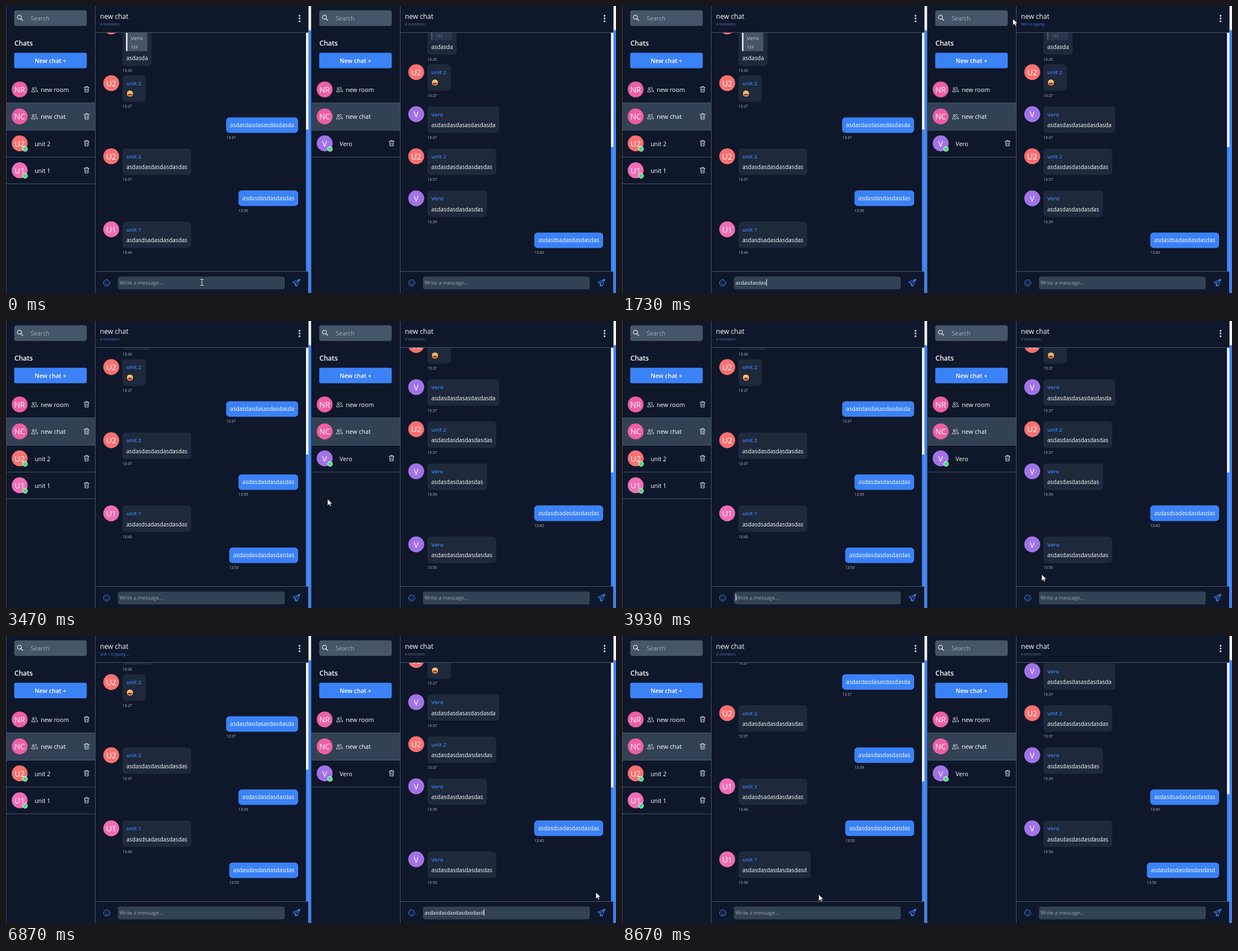
Write an HTML page with a canvas that moves like this. It is 1090x514 px and loops after 9590 ms.

```html
<!DOCTYPE html>
<html lang="en">
<head>
<meta charset="utf-8">
<title>Chat</title>
<style>
html, body { margin: 0; width: 100%; height: 100%; overflow: hidden; background: #0f172a; }
canvas { display: block; }
</style>
</head>
<body>
<canvas id="stage" width="1090" height="514"></canvas>
<script>
const c = document.getElementById('stage').getContext('2d');
const LOOP = 9590;
const BG = '#0f172a', LINE = '#475569', BLUE = '#3b82f6', WHITE = '#fff';
const people = {
  v: { name: 'Vero', mark: 'V', color: '#a273e6' },
  a: { name: 'unit 1', mark: 'U1', color: '#f16db5' },
  b: { name: 'unit 2', mark: 'U2', color: '#f97070' }
};
const log = [
  { who: 'b', text: 'asdasda', time: '13:26', quote: true },
  { who: 'b', text: '', time: '13:27' },
  { who: 'v', text: 'asdasdasdasasdasdasda', time: '13:37' },
  { who: 'b', text: 'asdasdasdasdasdasdas', time: '13:37' },
  { who: 'v', text: 'asdasdasdasdasdas', time: '13:39' },
  { who: 'a', text: 'asdasdsadasdasdasdas', time: '13:40' },
  { who: 'v', text: 'asdasdasdasdasdasdas', time: '13:50' },
  { who: 'a', text: 'asdasdasdasdasdasdasd', time: '13:50' }
];

// Piecewise linear keys: [time, value, value...]
function at(keys, t) {
  let i = 0;
  while (i < keys.length - 2 && t >= keys[i + 1][0]) i++;
  const [p, q] = [keys[i], keys[i + 1]];
  const k = Math.min(1, Math.max(0, (t - p[0]) / (q[0] - p[0])));
  return p.slice(1).map((v, n) => v + (q[n + 1] - v) * k);
}

function setFont(size, weight = 400) {
  c.font = `${weight} ${size}px "Open Sans", "Noto Sans", sans-serif`;
}
// y is the middle of the capitals
function text(s, x, y, size, color = WHITE, weight = 400, align = 'left') {
  setFont(size, weight);
  c.fillStyle = color;
  c.textAlign = align;
  c.fillText(s, x, y + size * 0.36);
}
function width(s, size, weight) {
  setFont(size, weight);
  return c.measureText(s).width;
}
function rect(x, y, w, h, color, r = 0) {
  c.fillStyle = color;
  c.beginPath();
  c.roundRect(x, y, w, h, r);
  c.fill();
}
function disc(x, y, r, color) {
  c.fillStyle = color;
  c.beginPath();
  c.arc(x, y, r, 0, 7);
  c.fill();
}
function stroke(d, x, y, color, w = 1) {
  c.save();
  c.translate(x, y);
  c.strokeStyle = color;
  c.lineWidth = w;
  c.lineJoin = c.lineCap = 'round';
  c.stroke(new Path2D(d));
  c.restore();
}
function fill(d, x, y, color, edge) {
  c.save();
  c.translate(x, y);
  const p = new Path2D(d);
  c.fillStyle = color;
  c.fill(p);
  if (edge) {
    c.strokeStyle = edge;
    c.lineWidth = 0.7;
    c.stroke(p);
  }
  c.restore();
}
function avatar(x, y, mark, color) {
  disc(x, y, 14.2, color);
  text(mark, x, y + 0.5, 14, WHITE, 500, 'center');
}

const trash = 'M-4.5-3.5H4.5M-1.5-3.5V-5H1.5V-3.5M-3.7-3.5L-3 5H3L3.7-3.5M-1.3-1.2V3M1.3-1.2V3';
const group = 'M-4-1.8A1.7 1.7 0 1 1-.6-1.8A1.7 1.7 0 1 1-4-1.8M-5.5 4C-5.3-.3.8-.3 1 4Z' +
  'M1-3.8A1.8 1.8 0 1 1 1.8-.3M2.5.8C4.4.8 5.4 2.2 5.6 4H3';
const smile = 'M5.6 0A5.6 5.6 0 1 1-5.6 0A5.6 5.6 0 1 1 5.6 0M-2.8 1.5Q0 5 2.8 1.5M-2-2V-1.4M2-2V-1.4';
const plane = 'M6.5-6.5L-6.5-1L-2.3 1.5L1 6.5ZM6.5-6.5L-2.3 1.5V6L.2 4';

function grin(x, y) {
  disc(x, y, 5.5, '#f8b53c');
  disc(x - 2, y - 2, 1.7, WHITE);
  disc(x + 2, y - 2, 1.5, WHITE);
  disc(x - 1.8, y - 1.8, 0.8, '#402a20');
  disc(x + 2, y - 2, 0.7, '#402a20');
  fill('M-3.6.6H3.6Q3 4.5 0 4.5T-3.6.6', x, y, '#8c2430');
  rect(x - 1.2, y + 2.4, 2.8, 2, '#f06a7c', 1);
}

function row(y, label, mark, color, opt) {
  const bottom = Math.round(y + 24);
  if (opt.active) rect(1, bottom - 48, 158, 48, '#334155');
  rect(1, bottom, 158, 1, LINE);
  avatar(24.4, y, mark, color);
  if (opt.group) stroke(group, 51, y, '#e2e8f0', 0.9);
  else {
    disc(34, y + 10, 4.7, WHITE);
    disc(34, y + 10, 3.7, '#3fdc7c');
  }
  text(label, opt.group ? 62 : 51, y + 0.7, 10.7);
  if (opt.trash) stroke(trash, 144, y - 0.3, '#e2e8f0', 0.9);
}

function sidebar(p) {
  rect(14.7, 7.8, 129.6, 28, LINE, 4);
  stroke('M3.5 0A3.5 3.5 0 1 1-3.5 0A3.5 3.5 0 1 1 3.5 0M2.5 2.5L6 6', 24, 20, '#f1f5f9', 1.1);
  text('Search', 44, 22.3, 10.7, '#a3acba');
  text('Chats', 15, 66.3, 12.1, WHITE, 600);
  rect(14.7, 83.8, 129.6, 27.7, BLUE, 3);
  text('New chat +', 79.5, 98.2, 10.6, WHITE, 600, 'center');
  const own = p.self === 'v';
  row(149.4, 'new room', 'NR', '#ed5ea5', { group: true, trash: own });
  row(197.8, 'new chat', 'NC', '#ed5ea5', { group: true, active: true, trash: own });
  (own ? ['b', 'a'] : ['v']).forEach((id, i) => {
    const u = people[id];
    row(246 + i * 48.3, u.name, u.mark, u.color, { trash: true });
  });
  rect(159, 0, 1, 514, LINE);
  rect(0, 0, 1, 514, '#3b475a');
}

function bubble(m, y, p, pending) {
  const mine = m.who === p.self, u = people[m.who];
  const name = mine ? 0 : width(u.name, 9.7, 600);
  const w = Math.max(name, width(m.text, 10), 28) + 14;
  const x = mine ? 522 - w : 208;
  const h = m.quote ? 84.5 : mine ? 27.8 : 47.5;
  rect(x, y, w, h, mine ? BLUE : '#1e293b', 6);
  if (!mine) {
    avatar(188, y + 14.1, u.mark, u.color);
    text(u.name, 215, y + 14.5, 9.7, BLUE, 600);
  }
  if (m.quote) {
    const lit = p.self === 'v';
    rect(214.5, y + 24, 38, 34, lit ? LINE : '#29364a', 2);
    rect(214.5, y + 24, 2.5, 34, lit ? '#f1f5f9' : LINE);
    text('Vero', 223, y + 35, 9.7, lit ? '#a5afbe' : '#64748b', 600);
    text('123', 223.5, y + 51, 6.7, lit ? '#e2e8f0' : '#718096');
  }
  if (m.text) text(m.text, x + 7, y + h - 13.8, 10, WHITE, 500);
  else grin(221.5, y + 32.8);
  text(m.time, x, y + h + 8.3, 6.7, '#b6bfcc');
  if (pending) stroke('M4 0A4 4 0 1 1-4 0A4 4 0 1 1 4 0M0-2.3V0L1.6 1', 517, y + h + 7, '#94a3b8', 0.8);
}

function panel(p) {
  c.save();
  c.translate(p.x, 0);
  rect(0, 0, 545, 514, BG);
  sidebar(p);

  text('new chat', 168, 18.2, 12.1);
  if (p.typist) text(p.typist + ' is typing...', 168, 32.8, 6.65, BLUE);
  else text('4 members', 168, 32.8, 6.65, p.self === 'v' ? '#5b6fae' : '#64748b');
  for (const y of [17.4, 22.3, 27.2]) disc(524.5, y, 1.5, WHITE);

  c.save();
  c.beginPath();
  c.rect(160, 48, 376, 427);
  c.clip();
  let y = 461.3;
  for (let i = p.count - 1; i >= 0; i--) {
    const m = log[i];
    y -= m.quote ? 112.4 - 11 : m.who === p.self ? 55.6 : 75.35;
    bubble(m, y, p, p.pending && i === p.count - 1);
  }
  c.restore();

  rect(160, 47, 385, 1, LINE);
  rect(160, 475, 385, 1, LINE);
  stroke(smile, 180, 496, BLUE);
  stroke(plane, 519, 495.5, BLUE, 1.1);
  rect(200, 484.5, 298, 23, '#334155', 4);
  if (p.draft) text(p.draft, 202.7, 495.5, 9.2);
  else text('Write a message...', 202.7, 495.5, 9.2, '#9aa4b2');
  if (p.caret) rect(203 + width(p.draft, 9.2), 489, 1, 12, WHITE);

  rect(536, 48, 5, 427, '#f1f1f1');
  rect(536, p.thumb, 5, 475 - p.thumb, BLUE, [2, 2, 0, 0]);
  rect(540.5, 0, 4.5, 514, '#f1f1f1');
  rect(540.5, 43, 4.5, 471, BLUE, [2, 2, 0, 0]);
  c.restore();
}

function divider() {
  const g = c.createLinearGradient(0, 0, 0, 514);
  g.addColorStop(0, '#6d7280');
  g.addColorStop(0.15, '#3f547f');
  g.addColorStop(0.4, '#2c4a85');
  g.addColorStop(1, '#2a467d');
  rect(539.5, 0, 11.5, 514, g);
  rect(544, 213, 2.2, 26, WHITE, 1);
}

const arrow = 'M0 0V11.5L2.7 9L4.5 13L6.4 12.2L4.7 8.3H8.3Z';
const resize = 'M-7 0L-3.5-3.2V-1H3.5V-3.2L7 0L3.5 3.2V1H-3.5V3.2Z';
const beam = 'M-2.5-5.5H-.6L0-5L.6-5.5H2.5M0-5V5M-2.5 5.5H-.6L0 5L.6 5.5H2.5';

const path = [
  [330, 547, 400], [470, 560, 390], [900, 765, 300], [1400, 740, 70], [1730, 698.5, 23],
  [2000, 690, 20], [2470, 552, 220], [2700, 547.5, 298], [3400, 547.5, 298],
  [3930, 750, 454], [4400, 762, 472], [4800, 815, 495], [6500, 815, 495],
  [6870, 1054, 459], [7070, 1062, 490], [7270, 1062, 490], [8070, 287.5, 445],
  [8400, 330, 469], [8670, 351.5, 463]
];

function pointer(t, split) {
  if (t < 70) return stroke(beam, 350, 495, '#e5e7eb');
  if (t < 330 || (t >= 5000 && t < 6500)) return;
  const [x, y] = at(path, t);
  if (split) fill(resize, x, y, WHITE, '#000');
  else if (t > 4600 && t < 5000) stroke(beam, x, y, '#e5e7eb');
  else fill(arrow, x, y, WHITE, '#222');
}

const leftKeys = [[470, 1], [1400, 7], [1470, 8], [1730, 11.1], [2400, 20]];
const rightKeys = [[5000, 1], [5930, 15], [6600, 21]];

function typed(msg, keys, from, to, t) {
  return t < from || t >= to ? '' : msg.slice(0, Math.floor(at(keys, t)[0] + 0.01));
}

function draw(t) {
  const split = (t >= 330 && t < 470) || (t >= 2530 && t < 3400);
  const blink = t0 => Math.floor((t - t0) / 500) % 2 === 1;
  const leftCount = t < 3130 ? 6 : t < 8270 ? 7 : 8;
  const rightCount = t < 3400 ? 6 : t < 7200 ? 7 : 8;

  panel({
    x: 0, self: 'v', count: leftCount, thumb: [221, 239, 260][leftCount - 6],
    pending: t >= 3130 && t < 3400,
    typist: t >= 5070 && t < 7200 ? people.a.name : '',
    draft: typed(log[6].text, leftKeys, 470, 3070, t),
    caret: (t >= 330 && t < 2530) || (t >= 2530 && t < 3070 && blink(2100)) ||
      (t >= 3400 && t < 4700 && blink(3400))
  });
  panel({
    x: 545, self: 'a', count: rightCount, thumb: [252, 271, 283][rightCount - 6],
    pending: t >= 7200 && t < 8270,
    typist: t >= 540 && t < 3070 ? people.v.name : '',
    draft: typed(log[7].text, rightKeys, 5000, 7200, t),
    caret: t >= 4700 && t < 7070
  });
  if (split) divider();
  pointer(t, split);
}

const start = performance.now();
function tick(now) {
  draw(Math.max(0, now - start) % LOOP);
  requestAnimationFrame(tick);
}
requestAnimationFrame(tick);
</script>
</body>
</html>
```
